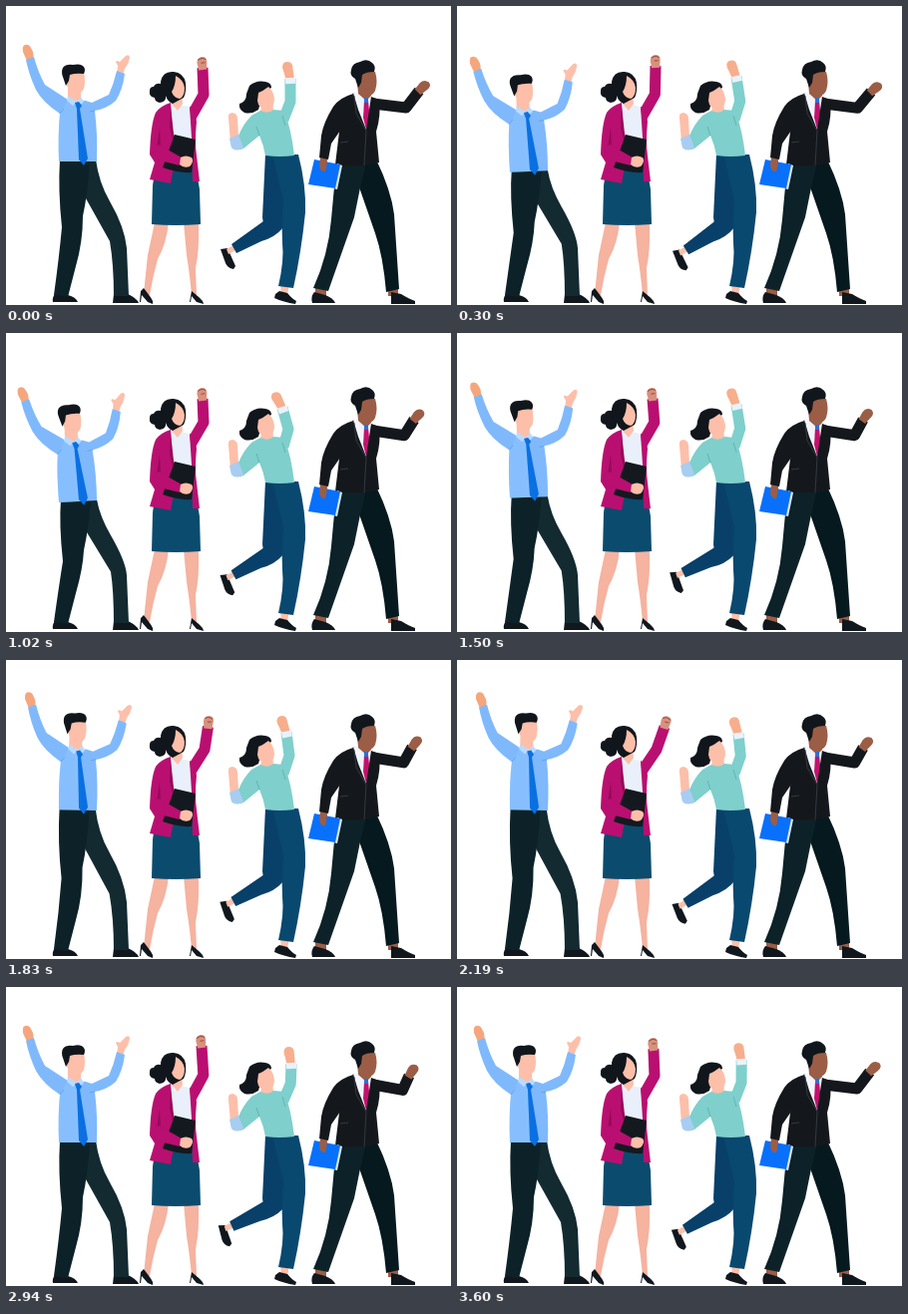
An HTML page that plays this animation: 446 by 300 pixels, repeating every 3630 ms.

```html
<!DOCTYPE html>
<html lang="en">
<head>
<meta charset="utf-8">
<title>Cheering team</title>
<style>
  html, body { margin: 0; width: 100%; height: 100%; overflow: hidden; background: #fff; }
  svg { display: block; width: 446px; height: 300px; }
  .limb { fill: none; stroke-linecap: butt; stroke-linejoin: round; }
  .skin { fill: #fdbfa9; }
  .hair { fill: #11161c; }
  .shoe { fill: #10171d; }
  .shirt { fill: #7fb9fc; stroke: #7fb9fc; }
  .coat { fill: #b90f70; stroke: #b90f70; }
  .top { fill: #7fcfcc; stroke: #7fcfcc; }
  .suit { fill: #14181c; stroke: #14181c; }
  .navy { fill: #084069; }
  .dark { fill: #0d2228; }
  .brown { fill: #9b5d46; }
  path.limb { fill: none; }
  .shirt:not(.limb), .coat:not(.limb), .top:not(.limb), .suit:not(.limb) { stroke: none; }
</style>
</head>
<body>
<svg viewBox="0 0 446 300">
  <!-- man in blue shirt -->
  <g>
    <path class="shoe" d="M49 289L62 290Q70 292 72 297H47Q46 293 49 289ZM108 289H122Q131 293 133 298H107Z"/>
    <path id="legR" fill="#132a31"/>
    <path id="legL" class="dark"/>
    <g id="bust">
      <path fill="#f5a67c" d="M21 55L17 46Q16 40 19 39Q23 38 25 42L27 46Q28 49 27 54Z"/>
      <path class="skin" d="M111 69L112 60L110 56Q111 54 114 56L120 50Q124 48 124 52Q123 58 119 63L117 70Z"/>
      <path class="shirt" d="M20 54L28 51Q32 66 39 79L62 94L80 95L86 97L103 89Q108 78 111 65L119 68Q117 84 110 95Q101 103 89 105Q92 130 91 156H53Q52 128 54 108Q37 97 30 84Q23 69 20 54Z"/>
      <path fill="#91c6ff" d="M54 108L62 94L70 97L74 156H53Q52 128 54 108Z" opacity=".45"/>
      <path class="limb" stroke="#5f9fe8" stroke-width=".8" d="M54 108L58 103M89 105L84 106"/>
      <path class="skin" d="M62 82H75V93L71 97L62 92Z"/>
      <path class="skin" d="M60 66H78Q80 76 78 83Q75 89 70 88Q62 86 60 76Z"/>
      <path class="hair" d="M60 80L57 71Q55 66 57 62Q60 58 67 59Q75 57 78 61Q80 64 78 68Q70 67 64 69L63 75Z"/>
      <path fill="#b9dbff" d="M62 90L71 96L67 100L61 95ZM75 91L78 96L74 100L71 96Z"/>
      <path fill="#0a70e2" d="M69 97L73 96L76 100L74 103L82 153L78 160L73 154L71 103Z"/>
    </g>
  </g>

  <!-- woman with clipboard -->
  <g>
    <path fill="#f5b3a0" d="M149 217H163Q161 238 152 254Q147 272 144 290L138 289Q140 268 142 250ZM178 217H193Q194 245 190 263L191 290H186Q184 268 181 250Z"/>
    <path class="shoe" d="M138 283L144 291Q148 296 147 299L142 297L136 290L135 297H134L135 286ZM186 286L192 291Q198 296 198 299L191 297L186 291L185 297H184Z"/>
    <path fill="#0b4b6d" d="M150 160H190L194 184L195 219Q170 221 146 219L147 180Z"/>
    <path id="sleeveW" class="coat limb" stroke-width="11"/>
    <g id="fistW">
      <path fill="#d9907c" d="M-4 2L-5 -5Q-5 -10 0 -11Q5 -11 5 -6L4 2Z"/>
      <path class="limb" stroke="#8d5146" stroke-width="1" d="M-4 -8Q0 -11 4 -8M-1 -5L3 -5"/>
    </g>
    <path fill="#e9f0fb" d="M165 97L184 101L188 132L165 145Z"/>
    <path class="skin" d="M166 88H176L177 98L172 105L166 98Z"/>
    <path class="hair" d="M155 76Q157 65 168 66Q178 67 180 77Q181 86 178 92L167 98Q162 96 160 90Q161 96 154 97Q149 96 149 92Q143 91 144 85Q144 81 148 81Q150 77 155 78Z"/>
    <path class="skin" d="M166 86Q170 80 170 70Q178 74 179 82Q179 91 174 93Q168 92 166 86Z"/>
    <path class="coat" d="M184 101Q190 103 191 116Q189 136 191 150L194 176H187L186 132Z"/>
    <path class="coat" d="M165 97L166 120L171 145L165 178L144 174L149 157L144 149Q145 118 150 107Q155 100 165 97Z"/>
    <path fill="#950a59" d="M165 100L168 128L172 140L170 147L164 122ZM154 122L155 142L162 149L158 152L151 143Z"/>
    <path fill="#14191f" d="M169 129L190 134L186 167Q173 168 157 162Z"/>
    <path class="coat" d="M146 143L153 139L176 152L174 160L150 154Z"/>
    <path class="skin" d="M175 152Q180 149 186 152Q189 156 184 161Q178 163 174 159Z"/>
  </g>

  <!-- woman in teal top -->
  <g>
    <g id="shin">
      <path class="shoe" d="M215 244L222 243L230 261L228 264Q222 263 220 258Z"/>
      <path class="skin" d="M221 244L230 239L232 244L223 249Z"/>
      <path class="navy" d="M277 203L278 222Q270 232 256 236L231 248L226 239L258 216Z"/>
    </g>
    <path class="navy" d="M260 148L282 150L279 213Q275 226 266 229Q258 226 257 212Z"/>
    <path class="skin" d="M275 279H284L282 290H276Z"/>
    <path class="shoe" d="M274 286L282 288Q287 294 291 296L290 299Q278 297 269 293L270 289Z"/>
    <path fill="#09486f" d="M267 149H293Q301 180 300 207Q296 247 288 283L273 281Q279 255 277 238Q276 214 278 196Z"/>
    <path id="sleeveG" class="top limb" stroke-width="11"/>
    <g id="fistG">
      <path fill="#f7ae8c" d="M-4 3L-6 -7Q-9 -15 -4 -17Q2 -18 3 -13L4 3Z"/>
      <path fill="#e9f2fb" d="M-5 -1H5V5H-5Z"/>
    </g>
    <path class="skin" d="M257 96H267L268 105L260 110L255 106Z"/>
    <path class="hair" d="M244 80Q251 74 260 76Q266 77 266 82L258 86L253 104Q246 109 239 107Q233 104 234 98Q241 96 241 88Z"/>
    <path class="skin" d="M253 87Q258 85 263 81Q269 86 269 95Q268 103 261 104Q253 103 252 95Z"/>
    <path class="skin" d="M225 137L223 113Q222 107 227 107Q232 108 232 113L233 131Z"/>
    <path class="top" d="M246 110L255 105Q263 109 268 104L279 105Q286 124 289 150Q274 152 260 150Q258 139 254 130L238 143Q231 146 226 142L225 134L233 130Q238 118 246 110Z"/>
    <path fill="#a8cdf2" d="M224 133L233 129L238 142Q230 147 226 142Z"/>
    <path class="limb" stroke="#5db3b1" stroke-width=".9" d="M254 130L251 121M277 110L280 120"/>
  </g>

  <!-- man in suit -->
  <g>
    <path class="brown" d="M310 283H321V291H310ZM383 283H393V291H383Z"/>
    <path class="shoe" d="M309 287L320 290Q328 293 330 298H307Q305 292 309 287ZM386 287L396 289Q404 294 410 296V299H386Z"/>
    <path fill="#06191e" d="M343 156L371 154Q386 185 389 209L394 284L381 287Q378 251 370 228L352 176Z"/>
    <path class="dark" d="M333 154L361 157Q354 185 349 212L323 286L308 283Q323 250 326 214Q328 184 333 154Z"/>
    <path id="sleeveM" class="suit limb" stroke-width="11"/>
    <g id="fistM"><path class="brown" d="M-4 2L-5 -6Q-5 -12 1 -13Q6 -12 5 -6L4 2Z"/></g>
    <path fill="#f1f5fb" d="M348 86L366 90L365 124L356 120Z"/>
    <path class="brown" d="M352 76H366V90L361 95L353 88Z"/>
    <path class="brown" d="M355 66H370Q373 76 370 85Q367 91 361 89Q354 86 354 75Z"/>
    <path class="hair" d="M353 82L350 73Q344 70 346 64Q347 57 355 56Q362 52 367 57Q371 60 369 66Q361 66 357 69L356 77Z"/>
    <path fill="#c3126e" d="M359 95L363 95L365 114L361 124L358 112Z"/>
    <path fill="#2d70d4" d="M359 92H363L363 97H359Z"/>
    <path class="suit" d="M348 87L353 104L361 124L366 91L374 94Q376 110 371 126L374 157Q352 163 330 159L334 126Z"/>
    <path class="limb" stroke="#39424a" stroke-width=".8" d="M349 90L351 108L361 125L359 160M335 137L343 136M335 120L337 109"/>
    <path class="brown" d="M315 151H322L321 163L316 167Z"/>
    <path fill="#dbe8fa" d="M332 158L337 160L332 184L328 183Z"/>
    <path fill="#0870fb" d="M309 154L335 159L330 183L303 179Z"/>
    <path class="brown" d="M315 151H322Q322 160 320 166Q315 167 314 160Z"/>
    <path class="suit" d="M348 88Q334 92 328 101Q318 117 316 130L314 152L323 154L326 138L337 122Z"/>
  </g>
</svg>
<script>
  const LOOP = 3630;
  const $ = id => document.getElementById(id);
  const set = (id, name, value) => $(id).setAttribute(name, value);
  const smooth = x => x * x * (3 - 2 * x);
  const span = (t, a, b) => Math.min(1, Math.max(0, (t - a) / (b - a)));

  // Smooth closed curve through [time, x, y] points.
  function along(keys, t) {
    const n = keys.length;
    const at = i => {
      const k = keys[(i + n) % n], turn = Math.floor(i / n) * LOOP;
      return [k[0] + turn, k[1], k[2]];
    };
    let i = n - 1;
    while (i > 0 && keys[i][0] > t) i--;
    const [p, a, b, q] = [at(i - 1), at(i), at(i + 1), at(i + 2)];
    const d = b[0] - a[0], u = (t - a[0]) / d;
    return [1, 2].map(c => {
      const va = (b[c] - p[c]) / (b[0] - p[0]) * d;
      const vb = (q[c] - a[c]) / (q[0] - a[0]) * d;
      const s = smooth(u);
      return a[c] + (b[c] - a[c]) * s + va * u * (1 - u) ** 2 - vb * u * u * (1 - u);
    });
  }

  // Wrist paths; the elbow follows a part of the wrist's travel.
  const arms = [
    { id: 'W', from: [185, 112], elbow: [198, 89], follow: .18, tilt: -4,
      keys: [[0, 197, 62], [300, 199, 60], [1020, 197, 66], [1500, 196, 66], [2190, 208, 67], [2940, 196, 59]] },
    { id: 'G', from: [278, 114], elbow: [285, 96], follow: .25, tilt: -4,
      keys: [[0, 285, 73], [300, 280, 71], [1020, 277, 75], [1500, 280, 72], [2190, 282, 74], [2940, 286, 77]] },
    { id: 'M', from: [368, 98], elbow: [401, 102], follow: .35, tilt: 8,
      keys: [[0, 414, 85], [300, 415, 86], [480, 416, 86], [1020, 409, 87], [1500, 407, 87], [2190, 407, 88], [2940, 404, 89]] }
  ];
  const kick = [[0, 0, 0], [300, -2, 0], [1020, 1, 0], [1500, 4, 0], [2190, -1, 0], [2940, 5, 0]];

  function moveArm({ id, from, elbow, follow, tilt, keys }, t) {
    const w = along(keys, t);
    const e = elbow.map((v, i) => v + (w[i] - keys[0][i + 1]) * follow);
    const angle = Math.atan2(w[0] - e[0], e[1] - w[1]) * 180 / Math.PI + tilt;
    set('sleeve' + id, 'd', `M${from}L${e}L${w}`);
    set('fist' + id, 'transform', `translate(${w}) rotate(${angle})`);
  }

  // 1 is the crouch, 0 the rest pose, below 0 the stretch.
  function crouch(t) {
    const down = 1 - (1 - span(t, 0, 540)) ** 1.8;
    return down - 1.42 * smooth(span(t, 1440, 1640)) + .42 * smooth(span(t, 2190, 2690));
  }

  function moveMan(t) {
    const p = crouch(t), y = 13 * p, k = 7 * p, x = p;
    set('bust', 'transform', `translate(0 ${y}) rotate(${-2.7 * p} 72 155)`);
    set('legL', 'd', `M${54 + x} ${154 + y}L${84 + x} ${155 + y}Q${82 + x} ${188 + k} ${77 + x} ${211 + k}
      Q77 237 70 261L62 292L48 290Q53 254 ${56 + x} ${222 + k}Q${52 + x} ${185 + k} ${54 + x} ${154 + y}Z`);
    set('legR', 'd', `M${72 + x} ${155 + y}L${90 + x} ${154 + y}Q${93 + x} ${177 + k} ${104 + x} ${196 + k}
      Q${119 + x} ${222 + k} 121 243L123 291H108Q108 259 ${104 + x} ${236 + k / 2}L${80 + x} ${193 + k}Z`);
  }

  function draw(now) {
    const t = now % LOOP;
    moveMan(t);
    arms.forEach(arm => moveArm(arm, t));
    set('shin', 'transform', `rotate(${along(kick, t)[0]} 268 216)`);
    requestAnimationFrame(() => draw(performance.now()));
  }
  draw(0);
</script>
</body>
</html>
```
